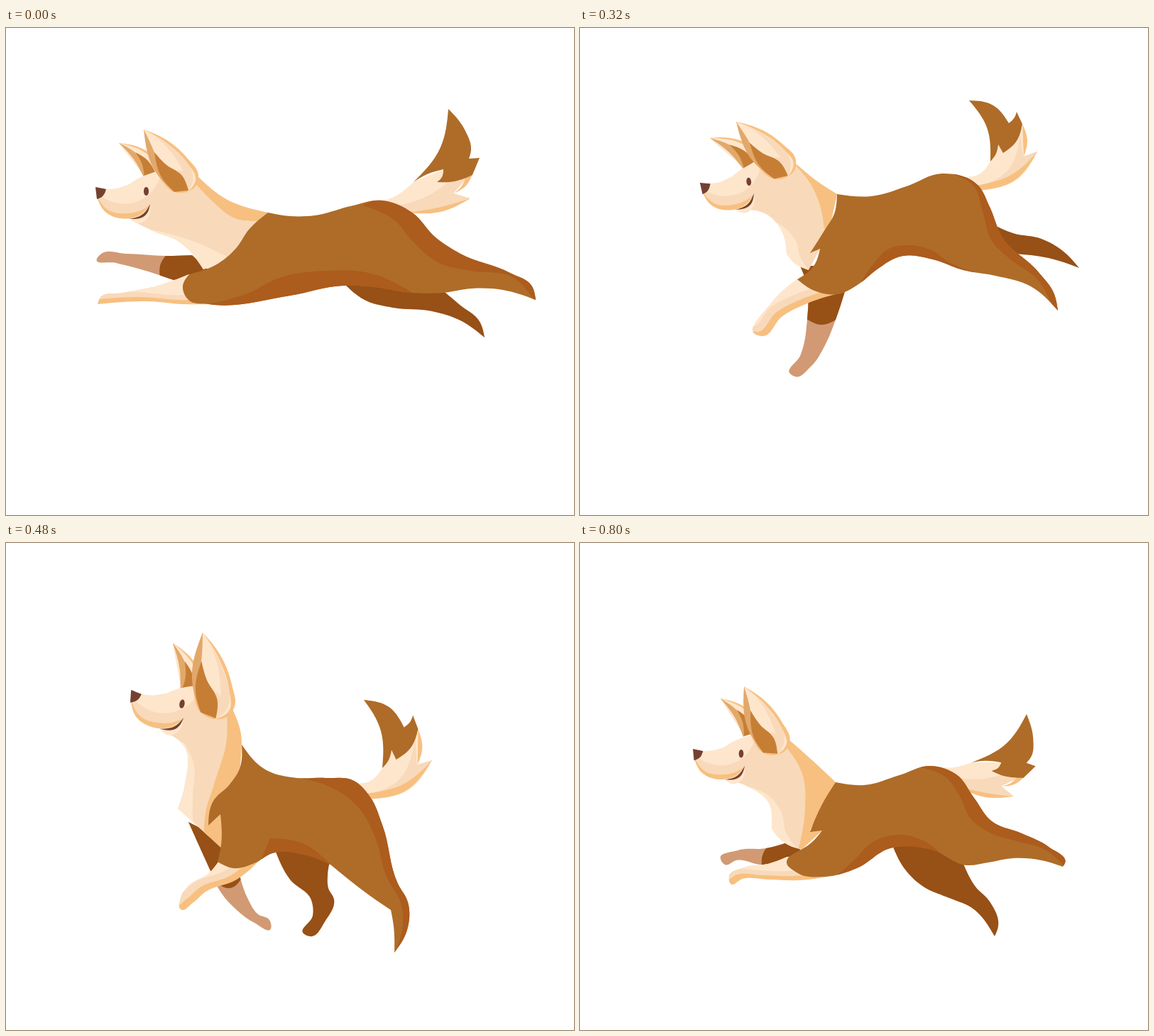
Recreate the animation shown at these times as an HTML page. Size 800 by 686 pixels, loop 960 ms.

```html
<!DOCTYPE html>
<html lang="en">
<head>
<meta charset="utf-8">
<title>Running dog</title>
<style>
html, body { margin: 0; width: 100%; height: 100%; overflow: hidden; background: #fff; }
svg { display: block; width: 100vw; height: 100vh; }
</style>
</head>
<body>
<svg id="stage" viewBox="0 0 800 686"></svg>
<script>
const STEP = 160;
const BROWN = '#ae6c28', RUST = '#ac5c1d', DARK = '#975016', ORANGE = '#f7c080', PEACH = '#f8d9ba';
const CREAM = '#fee6cc', TAN = '#e2a86a', INNER = '#c67e35', PAW = '#d19a74', NOSE = '#744031';

const parse = text => text.split(' ').map(word => {
  const [x, y] = word.split(',').map(parseFloat);
  return { x, y, sharp: word.endsWith('!') };
});

// Smooth closed curve through "x,y" points; a trailing "!" makes a corner.
function curve(text) {
  const pts = parse(text), n = pts.length;
  const dir = pts.map((p, i) => {
    const a = pts[(i + n - 1) % n], b = pts[(i + 1) % n];
    const la = Math.hypot(p.x - a.x, p.y - a.y), lb = Math.hypot(b.x - p.x, b.y - p.y);
    const x = (p.x - a.x) * lb / la + (b.x - p.x) * la / lb;
    const y = (p.y - a.y) * lb / la + (b.y - p.y) * la / lb;
    const l = Math.hypot(x, y) || 1;
    return { x: x / l, y: y / l };
  });
  const mid = (a, b) => ({ x: (a.x + b.x) / 2, y: (a.y + b.y) / 2 });
  let d = `M${pts[0].x} ${pts[0].y}`;
  pts.forEach((p, i) => {
    const j = (i + 1) % n, q = pts[j], k = Math.hypot(q.x - p.x, q.y - p.y) * 0.35;
    let c = { x: p.x + dir[i].x * k, y: p.y + dir[i].y * k };
    let e = { x: q.x - dir[j].x * k, y: q.y - dir[j].y * k };
    if (p.sharp && q.sharp) { c = p; e = q; }
    else if (p.sharp) c = mid(p, e);
    else if (q.sharp) e = mid(q, c);
    d += `C${c.x} ${c.y} ${e.x} ${e.y} ${q.x} ${q.y}`;
  });
  return d + 'Z';
}

const fill = (color, text) => `<path fill="${color}" d="${curve(text)}"/>`;

let clips = 0;
function shaded(color, outline, inside) {
  const id = 'clip' + clips++;
  return `<clipPath id="${id}"><path d="${curve(outline)}"/></clipPath>` +
    fill(color, outline) + `<g clip-path="url(#${id})">${inside}</g>`;
}

// Two edge vectors from the first anchor; two anchors mean a similarity.
function edges([p, q, r]) {
  const u = [q.x - p.x, q.y - p.y];
  return [u, r ? [r.x - p.x, r.y - p.y] : [-u[1], u[0]]];
}

function fit(from, to) {
  const [u, v] = edges(from), [s, t] = edges(to);
  const det = u[0] * v[1] - u[1] * v[0];
  const col = i => [(s[i] * v[1] - t[i] * u[1]) / det, (t[i] * u[0] - s[i] * v[0]) / det];
  const [a, c] = col(0), [b, d] = col(1), { x, y } = from[0];
  return `matrix(${[a, b, c, d, to[0].x - a * x - c * y, to[0].y - b * x - d * y]})`;
}

// A rigid part that is placed by its anchor points.
const part = (anchors, art) => place =>
  `<g transform="${fit(parse(anchors), parse(place))}">${art}</g>`;

const face = part('126,225 203,249',
  fill(CREAM, '175,270! 195,266 203,250! 200,267 187,275') +
  fill(ORANGE, '128,238! 141,260 160,268 185,265 203,249! 150,235!') +
  fill(PEACH, '128,236! 145,257 172,261 190,257 203,249! 217,205! 190,215!') +
  fill(CREAM, '126,225! 141,227! 165,224 188,211 212,202! 219,206! 203,233 176,247 150,245 132,236!') +
  fill(NOSE, '173,269! 193,262 203,248! 197,263') +
  fill(NOSE, '126,224! 141,227! 136,237 128,241!') +
  fill(NOSE, '197.5,224 201,230 197.5,236 194,230'));

const ear = part('194,143 257,230',
  fill(ORANGE, '194,143! 225,157 255,183 271,208 267,223 257,230 237,231 218,213 205,180') +
  fill(CREAM, '194,143! 230,165 255,190 267,214 257,230! 215,195!') +
  fill(PEACH, '200,149! 235,170 263,216 257,230! 245,205') +
  fill(CREAM, '195,144! 222,163 250,202! 222,194! 209,176!') +
  fill(TAN, '194,143! 209,200 237,231! 218,205 210,178') +
  fill(INNER, '209,175! 225,192 248,208 257,229! 237,231! 219,210'));

const backEar = part('159,162 194,209',
  fill(ORANGE, '159,162! 185,167 206,178! 214,200! 196,209!') +
  fill(CREAM, '159,162! 190,172 210,186! 212,200! 196,209!') +
  fill(TAN, '159,162! 180,185 194,210! 204,204! 185,178') +
  fill(INNER, '182,175! 200,187 210,203! 195,209! 191,190'));

const tailUp = part('623,114 574,217 654,240',
  fill(CREAM, '524,246! 550,236 574,217! 616,199! 650,210! 630,233! 654,240! 610,256 560,262!') +
  fill(PEACH, '545,252! 595,236 628,213! 650,210! 630,233! 654,240! 610,257 565,261!') +
  fill(ORANGE, '657,206! 648,222 631,233! 642,222 648,209!') +
  fill(ORANGE, '654,240! 612,259 566,260! 613,252') +
  fill(BROWN, '623,114! 647,145 655,172 652,184! 667,183! 657,207! 632,216 607,217! 614,210 616,199! 593,206 574,217! 612,168'));

const tailCurl = part('548,102 578,188 644,174',
  fill(CREAM, '578,188! 562,206 542,210! 562,228! 615,214 644,174! 625,181! 623,140! 589,164!') +
  fill(PEACH, '620,148! 624,181! 644,174! 610,213 560,223! 600,203') +
  fill(ORANGE, '623,135! 630,158 625,181!') +
  fill(ORANGE, '644,174! 613,214 563,229! 558,222! 609,206') +
  fill(BROWN, '548,102! 582,109 604,134! 612,126 615,118! 623,135! 615,159 596,176! 589,164! 586,177 578,188! 573,140'));

const farLeg = text => fill(DARK, text);
const farArm = (outline, sleeve) => shaded(PAW, outline, fill(DARK, sleeve));
const neck = (outline, light, warm) => shaded(PEACH, outline, fill(CREAM, light) + fill(ORANGE, warm));
const trunk = (outline, back, belly) => shaded(BROWN, outline, fill(RUST, back) + fill(RUST, belly));
const arm = outline => shaded(ORANGE, outline,
  `<g transform="translate(-8 -6)">${fill(PEACH, outline)}</g>` +
  `<g transform="translate(-16 -13)">${fill(CREAM, outline)}</g>`);
const standLeg = dy => `<g transform="translate(0 ${dy})">` +
  farLeg('378,430! 400,474 430,503 432,525 419,550 428,554 450,532 462,502 454,486 453,468 457,445!') + '</g>';

function stretch() {
  return farLeg('476,360! 505,383 545,394 600,399 640,412 674,436! 668,415 638,389 618,372! 560,350!') +
    farArm('262,320! 225,321 170,318 133,319 128,325 155,331 190,340 236,355! 290,345!',
      '227,318! 217,335 217,352! 300,370! 300,310!') +
    tailUp('623,114 574,217 654,240') +
    backEar('159,162 194,209') +
    neck('269,208! 310,241 369,260! 340,300! 325,325! 278,340! 245,302 205,285 177,271! 203,249! 200,210!',
      '205,284! 260,299 311,322! 270,360! 200,310!',
      '267,219! 295,248 320,267 356,272! 390,260! 330,225! 269,200!') +
    face('126,225 203,249') +
    arm('258,347! 215,363 165,373 132,381 129,389! 150,387 200,385 250,389 292,389! 275,350!') +
    trunk('369,260! 400,265 435,264 485,251 530,243 572,260 605,295 640,318 710,345 741,364 746,383! 700,369 655,367 615,373 572,373 510,364 475,363 400,377 285,389 257,383 249,364 258,347! 300,331 325,309 342,284',
      '502,250! 545,269 575,303 610,331 655,342 715,352 744,384! 800,340! 560,220!',
      '285,389! 340,374 385,352 450,342 515,346 573,373! 480,420!') +
    ear('194,143 257,230');
}

function glide() {
  return farLeg('550,288! 590,299 632,306 665,311 688,326! 640,328 603,338! 565,330!') +
    farArm('275,417! 240,449 226,470 233,472 255,451 308,427! 328,414! 300,410!',
      '299,412! 301,421 308,430! 340,410!') +
    tailUp('595,130 556,237 638,251') +
    backEar('169,174 207,224') +
    neck('276,219! 315,247 356,285! 310,350! 288,376! 262,364 255,349 250,313 228,292 192,279! 218,261! 220,215!',
      '220,290! 250,300 270,327 272,350 285,376! 230,370!',
      '276,228! 293,280 296,330 292,376! 360,360! 370,260! 280,210!') +
    face('144,237 218,261') +
    arm('266,384! 220,406 184,440 188,447 215,432 265,419 328,415! 290,390!') +
    trunk('356,285! 400,287 450,272 492,258 533,270 565,308 605,338 660,356 696,374 695,385! 650,380 600,381 560,383 515,377 450,374 400,387 360,407 305,415 277,403 265,383! 300,365 319,335! 304,345! 325,313',
      '505,259! 530,272 548,305 580,341 640,364 695,383! 730,360! 560,240!',
      '330,414! 370,388 400,361 440,353 490,362 570,383! 440,430!') +
    ear('197,153 265,237');
}

function reach() {
  return farLeg('580,276! 610,289 650,297 680,314 703,338! 660,324 612,318! 590,310!') +
    farArm('310,335! 319,360 320,410 310,462 296,487 303,491 325,477 345,447 360,411 374,368! 345,335!',
      '318,409! 340,418 362,410! 400,350! 300,320!') +
    tailCurl('548,102 578,188 644,174') +
    backEar('183,155 230,198') +
    neck('303,190! 330,213 362,234! 350,290! 325,316! 338,311! 322,341! 302,331 291,318! 286,290 268,266 218,256! 245,234! 245,195!',
      '250,264! 285,279 304,300 310,322 325,345! 260,330!',
      '303,193! 325,220 338,250 344,283! 400,260! 340,200!') +
    face('169,219 245,234') +
    arm('306,354! 270,387 248,432 256,434 285,406 320,388 372,372! 345,360!') +
    trunk('362,234! 410,237 460,223 510,205 560,221 577,252 595,295 645,343 668,375 673,398! 635,364 585,349 540,341 497,326 455,321 417,341 395,359 362,375 330,370 306,354! 330,334 338,311! 324,317! 345,284 358,262',
      '525,206! 553,221 567,258 580,300 605,325 645,355 668,400! 710,380! 600,220! 540,190!',
      '396,358! 415,330 435,311 460,306 495,313 520,330 560,345! 460,370!') +
    ear('220,132 293,209');
}

function land() {
  return standLeg(0) +
    farArm('257,393! 288,462! 300,488 325,517 350,535 373,543 371,531 355,523 341,502 329,468! 330,430!',
      '296,478! 316,486 332,472! 340,420! 250,380!') +
    tailCurl('504,221 530,317 600,306') +
    backEar('235,141 246,208') +
    neck('319,234! 331,270 331,300 325,345! 304,382! 304,430! 242,374! 252,340 250,285 219,265! 250,247! 262,205!',
      '250,280! 264,310 263,360 266,400 285,425! 235,380! 240,290!',
      '311,240! 311,275 293,340 281,380 279,412! 310,440! 350,300! 320,225!') +
    face('176,208 250,247') +
    arm('300,448! 285,466 258,482 246,500 246,516 263,507 280,492 325,474 362,442!') +
    trunk('332,284! 365,319 410,331 450,331 490,335 513,358 530,397 552,480 566,506 565,545 547,577! 546,540 542,517! 510,495 457,453! 420,439 375,437 350,451 320,458 298,449! 303,425 302,382! 285,398! 291,365 315,340 329,318',
      '410,331! 460,345 500,377 520,415 536,470 557,510 558,545 546,580! 600,550! 540,340! 480,310!',
      '360,445! 372,416! 420,424 457,453! 410,460!') +
    ear('277,126 295,248');
}

function gather() {
  return standLeg(22) +
    farArm('277,440! 277,465! 274,492 252,525 242,550 246,565 252,552 260,538 290,527 320,510 345,482! 300,440!',
      '262,513! 285,518 319,511! 360,480! 300,420! 260,440!') +
    tailUp('566,225 503,308 571,344') +
    backEar('184,206 216,258') +
    neck('285,266! 310,298 338,333! 330,370! 286,411! 306,406! 289,449! 265,433 247,412! 246,362 228,328 198,315! 224,295! 232,250!',
      '226,326! 248,345 261,378 262,415 280,447! 230,420!',
      '283,276! 295,315 287,355 277,395 277,445! 300,455! 350,380! 350,300! 285,255!') +
    face('149,271 224,295') +
    arm('280,460! 255,467 218,470 199,485 208,489 224,483 260,491 305,494 340,488! 300,465!') +
    trunk('338,333! 368,343 402,342 462,323 498,331 517,357 528,395 540,426 580,447 602,472 605,516! 588,494 568,480 530,480 495,474 463,452 430,443 390,458 360,477 325,491 293,484 280,460! 297,435 306,406! 286,411! 305,386 330,366',
      '445,323! 485,335 508,367 516,408 545,447 585,475 605,518! 650,490! 540,340! 470,300!',
      '336,490! 365,462 377,435! 425,416! 450,430 475,455! 430,480!') +
    ear('218,184 268,289');
}

function spring() {
  return farLeg('440,426! 458,460 485,485 520,500 552,514 584,554! 589,540 577,505 557,484 540,452! 500,420!') +
    farArm('295,421! 262,430 222,433 198,445 204,453 220,447 257,453 295,442! 312,432!',
      '264,427! 257,440 256,456! 310,450! 310,415!') +
    tailUp('629,241 552,309 611,357') +
    backEar('198,219 230,272') +
    neck('294,277! 328,307 360,337! 324,405! 341,405! 312,432! 285,420 270,402! 264,363 240,345 208,333! 232,314! 245,265!',
      '238,343! 268,358 285,383 289,405 307,432! 250,410!',
      '291,288! 313,325 317,375 308,430! 350,440! 370,320! 300,265!') +
    face('159,291 232,315') +
    arm('292,442! 265,452 232,457 210,470 212,480 229,473 265,474 310,475 350,470! 320,450!') +
    trunk('360,337! 400,341 450,327 493,314 530,326 555,359 580,392 622,409 660,428 683,451 680,456! 650,447 610,444 575,450 545,454 495,432 437,430 390,458 345,470 305,464 291,449 302,437! 326,422 341,405! 324,407! 340,370',
      '478,316! 515,330 535,357 550,388 575,407 615,420 655,432 682,455! 700,430! 600,370! 520,300!',
      '362,468! 388,445 410,423 450,411 485,420 510,439! 440,480!') +
    ear('231,202 278,298');
}

const stage = document.getElementById('stage');
stage.innerHTML = [stretch, glide, reach, land, gather, spring]
  .map(pose => `<g visibility="hidden">${pose()}</g>`).join('');
const views = [...stage.children];

function draw(time) {
  const current = Math.floor(time / STEP) % views.length;
  views.forEach((view, i) => view.setAttribute('visibility', i === current ? 'visible' : 'hidden'));
}

let start = null;
function tick(now) {
  if (start === null) start = now;
  draw(now - start);
  requestAnimationFrame(tick);
}
draw(0);
requestAnimationFrame(tick);
</script>
</body>
</html>
```
